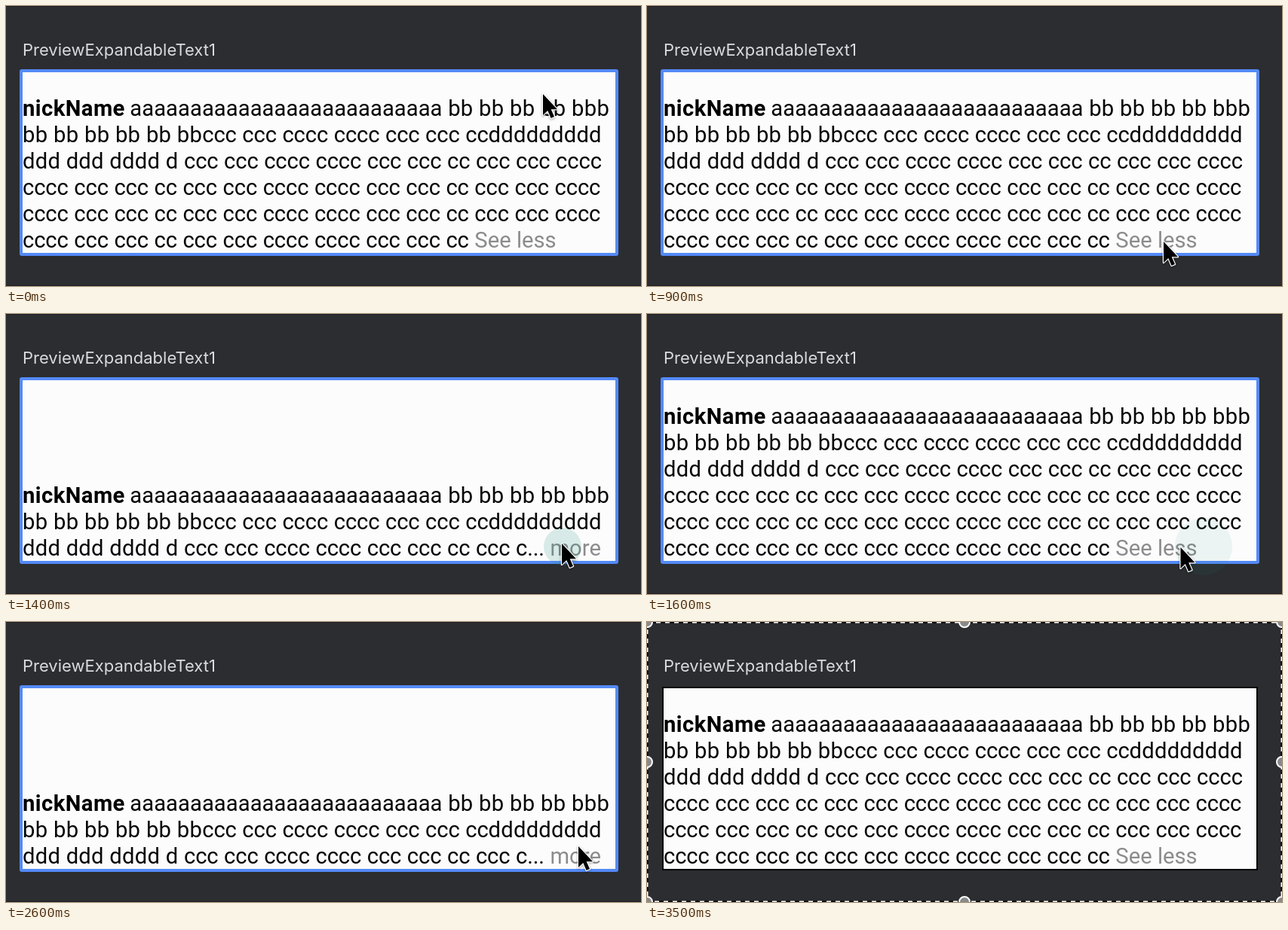
Write an HTML page that moves like this. It is 842 px wide and 372 px high and loops after 4.1 s.

```html
<!DOCTYPE html>
<html lang="en">
<head>
<meta charset="utf-8">
<title>Expandable text preview</title>
<style>
  html, body { margin: 0; width: 100%; height: 100%; overflow: hidden; background: #2b2d30; }
  svg { display: block; width: 842px; height: 372px; }
  .label { font: 22px Inter, sans-serif; fill: #d9dadd; }
  .body text { font: 29.2px Roboto, sans-serif; fill: #060606; }
  .body .name { font-weight: 700; letter-spacing: .45px; fill: #000; }
  .body .link { fill: #8b8b8b; }
  .arrow { filter: drop-shadow(0 1px 1.5px rgba(0, 0, 0, .35)); }
</style>
</head>
<body>
<svg viewBox="0 0 842 372">
  <rect width="842" height="372" fill="#2b2d30"/>
  <path d="M0 .5H842M0 371.5H842" stroke="#1e1f22"/>
  <text class="label" x="22" y="66">PreviewExpandableText1</text>

  <rect id="hover" x="18" y="84" width="794" height="248" rx="3" fill="#548af7"/>
  <rect id="idle" x="20" y="86" width="790" height="244" fill="#000"/>
  <rect x="22" y="88" width="786" height="240" fill="#fcfcfc"/>

  <g id="open" class="body"></g>
  <g id="closed" class="body"></g>

  <circle id="ripple" fill="rgb(40,140,125)"/>
  <g id="cursor" class="arrow">
    <path d="M1 1V29L7.3 23L11.6 33L16 31.1L11.7 21.2H20Z" fill="#000" stroke="#fff" stroke-width="2.4" paint-order="stroke" stroke-linejoin="round"/>
  </g>

  <g id="frame">
    <rect width="842" height="372" fill="none" stroke="#000" stroke-width="3"/>
    <rect width="842" height="372" fill="none" stroke="#fff" stroke-width="3" stroke-dasharray="6 6"/>
  </g>
</svg>
<script>
  const NS = 'http://www.w3.org/2000/svg';
  const LOOP = 4100, STEP = 100, END = 3500;
  const LEFT = 22, UNIT = 0.7587, BASE = 146.3, PITCH = 34.9;
  const $ = id => document.getElementById(id);

  // Whole-pixel glyph advances of the device, scaled by UNIT on the stage
  const ADVANCE = { a: 21, b: 22, c: 20, d: 22, ' ': 10, '.': 10 };

  function add(parent, tag, attrs, text) {
    const el = document.createElementNS(NS, tag);
    for (const k in attrs) el.setAttribute(k, attrs[k]);
    if (text) el.textContent = text;
    return parent.appendChild(el);
  }

  // Sets a line on the advance grid and returns where it ends
  function setLine(parent, text, x, y) {
    const xs = [];
    for (const ch of text) {
      xs.push(x.toFixed(2));
      x += ADVANCE[ch] * UNIT;
    }
    add(parent, 'text', { x: xs.join(' '), y }, text);
    return x;
  }

  const words = 'cccc ccc ccc cc ccc ccc cccc cccc ccc ccc cc';
  const full = words + ' ccc ccc cccc';
  const third = 'ddd ddd dddd d ccc ccc cccc cccc ccc ccc cc ccc c';
  const head = [
    'a'.repeat(26) + ' bb bb bb bb bbb',
    'bb bb bb bb bb bbccc ccc cccc cccc ccc ccc cc' + 'd'.repeat(9)
  ];

  function paragraph(group, lines, firstRow, link) {
    const rowY = i => BASE + PITCH * (firstRow + i);
    add(group, 'text', { class: 'name', x: LEFT, y: rowY(0) }, 'nickName');
    let end;
    lines.forEach((line, i) => { end = setLine(group, line, i ? LEFT : 164.3, rowY(i)); });
    add(group, 'text', {
      class: 'link', x: end + ADVANCE[' '] * UNIT, y: rowY(lines.length - 1)
    }, link);
  }

  paragraph($('open'), [...head, third + 'cc cccc', full, full, words], 0, 'See less');
  paragraph($('closed'), [...head, third + '...'], 3, 'more');

  for (const cx of [0, 421, 842])
    for (const cy of [0, 186, 372])
      if (cx !== 421 || cy !== 186)
        add($('frame'), 'circle', { cx, cy, r: 7, fill: '#8a8a8a', stroke: '#fff', 'stroke-width': 2 });

  // Pointer path: time, x, y
  const path = [
    [0, 711, 116], [100, 711, 119], [400, 704, 205], [600, 690, 297], [900, 684, 312],
    [1100, 684, 312], [1300, 735, 304], [1500, 737, 304], [1700, 676, 314], [1900, 674, 314],
    [2100, 674, 314], [2400, 757, 297], [2600, 758, 297], [2800, 757, 297], [3000, 757, 297],
    [3400, 782, 318]
  ];

  // Taps: start, end, x, y
  const taps = [
    [1000, 1300, 684, 316], [1400, 1700, 738, 309],
    [1900, 2200, 672, 318], [2650, 2800, 758, 301]
  ];

  function pointer(t) {
    const i = path.findIndex(p => p[0] > t);
    if (i < 0) return path[path.length - 1].slice(1);
    const [a, b] = [path[i - 1], path[i]];
    const k = (t - a[0]) / (b[0] - a[0]);
    return [a[1] + (b[1] - a[1]) * k, a[2] + (b[2] - a[2]) * k];
  }

  const show = (id, on) => $(id).setAttribute('visibility', on ? 'visible' : 'hidden');

  function draw(t) {
    const done = t >= END;
    const closed = (t >= 1100 && t < 1500) || (t >= 2100 && t < 2700);
    show('closed', closed);
    show('open', !closed);
    show('hover', !done);
    show('idle', done);
    show('frame', done);
    show('cursor', !done);

    const [x, y] = pointer(t);
    $('cursor').setAttribute('transform', `translate(${x.toFixed(1)} ${y.toFixed(1)})`);

    const tap = taps.find(([from, to]) => t >= from && t < to);
    show('ripple', tap);
    if (tap) {
      const age = t - tap[0];
      const ripple = $('ripple');
      ripple.setAttribute('cx', tap[2]);
      ripple.setAttribute('cy', tap[3]);
      ripple.setAttribute('r', 25 + age * 0.066);
      ripple.setAttribute('opacity', 0.17 - age * 0.0005);
    }
  }

  const start = performance.now();
  function tick() {
    const t = (performance.now() - start) % LOOP;
    draw(Math.floor(t / STEP) * STEP);
    requestAnimationFrame(tick);
  }
  tick();
</script>
</body>
</html>
```
